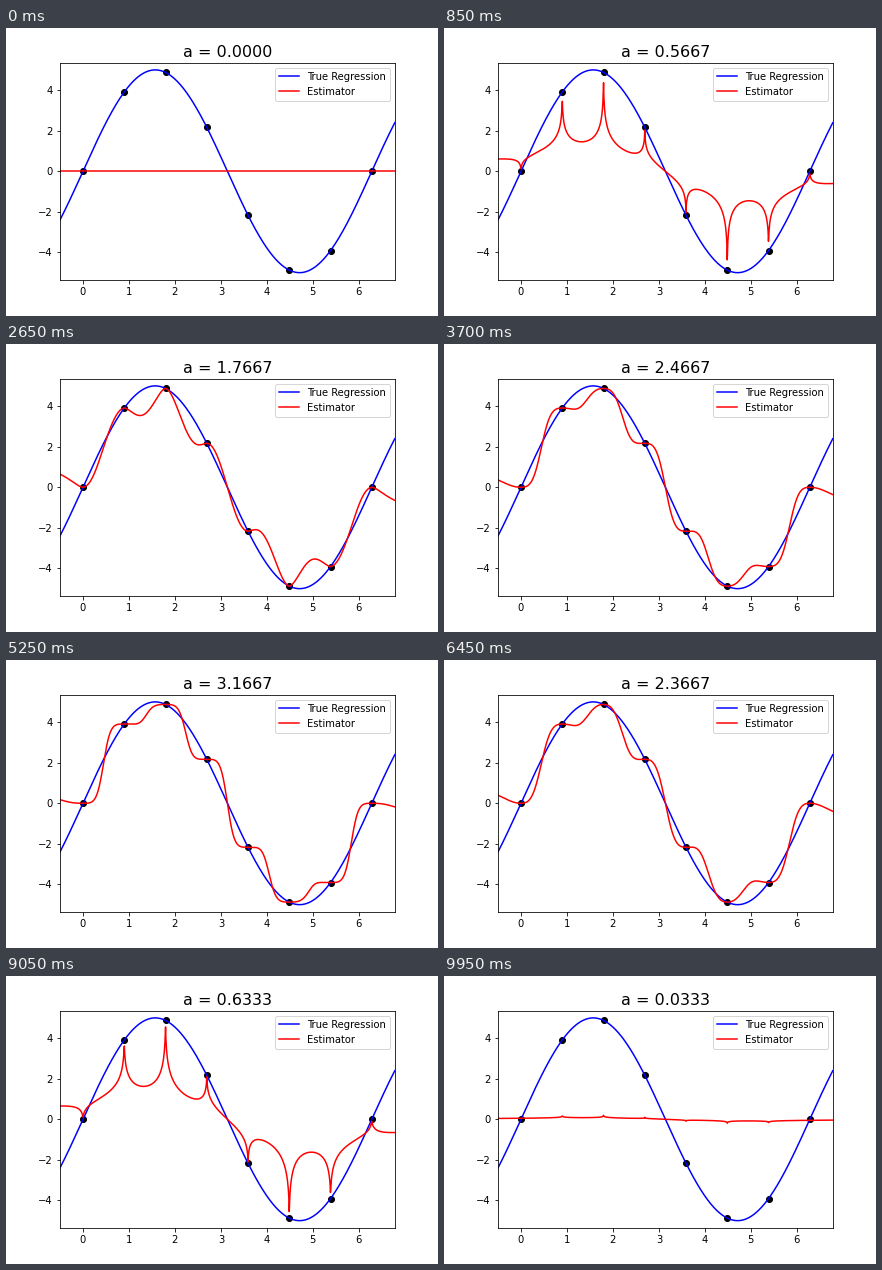
A matplotlib script for the animation above (10 s loop, 432x288 px).

```python
import numpy as np
import matplotlib.pyplot as plt
from matplotlib.animation import FuncAnimation

FRAMES = 200
INTERVAL = 50
MARGIN = 0.5

plt.rcParams["font.family"] = "DejaVu Sans"


def truth(x):
    return 5 * np.sin(x)


nodes = np.linspace(0, 2 * np.pi, 8)
values = truth(nodes)
grid = np.linspace(-MARGIN, 2 * np.pi + MARGIN, 1000)
distance = np.abs(grid[:, None] - nodes)


def estimate(a):
    """Kernel regression with the singular kernel |x|^-a."""
    weights = distance ** -a
    return weights @ values / weights.sum(axis=1)


fig = plt.figure(figsize=(6, 4), dpi=72, facecolor="white")
fig.subplots_adjust(left=0.125, right=0.9, bottom=0.125, top=0.88)
ax = fig.add_subplot()

ax.scatter(nodes, values, s=36, color="black")
ax.plot(grid, truth(grid), color="b", lw=1.5, label="True Regression")
curve, = ax.plot(grid, estimate(0.0), color="r", lw=1.5, label="Estimator")

y_max = 1.1 * values.max()
ax.set_xlim(grid[0], grid[-1])
ax.set_ylim(-y_max, y_max)
ax.legend(loc="upper right", fontsize=10)
title = ax.set_title("a = 0.0000", fontsize=16)


def update(frame):
    # The exponent rises from 0 to 10/3 and falls back linearly.
    a = min(frame, FRAMES - frame) / 30
    curve.set_ydata(estimate(a))
    title.set_text(f"a = {a:.4f}")
    return curve, title


anim = FuncAnimation(fig, update, frames=FRAMES, interval=INTERVAL,
                     repeat=True, repeat_delay=0, blit=False)
plt.show()
```
